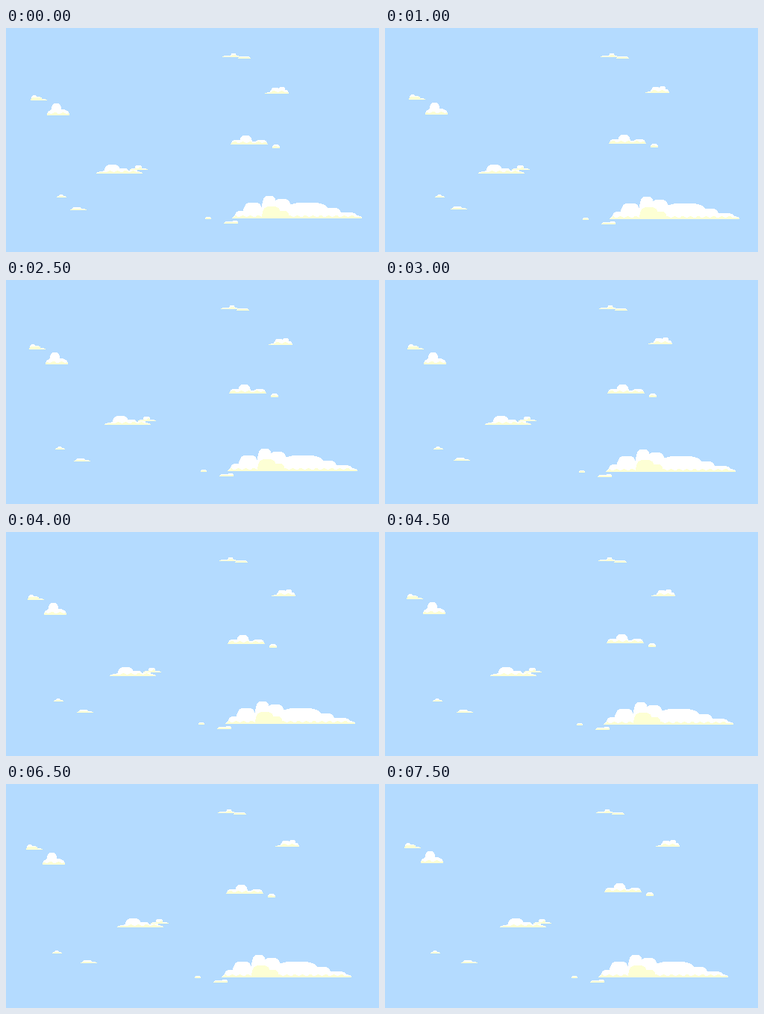
An HTML page with a canvas for the animation above (8 s loop, 500x300 px).

```html
<!DOCTYPE html>
<html lang="en">
<head>
<meta charset="utf-8">
<title>Drifting clouds</title>
<style>
html, body { margin: 0; width: 100%; height: 100%; overflow: hidden; background: #b4dbff; }
canvas { display: block; }
</style>
</head>
<body>
<canvas width="500" height="300"></canvas>
<script>
const STEP = 500, LOOP = 8000;
const WHITE = '#fff', CREAM = '#fdffd4';
const ctx = document.querySelector('canvas').getContext('2d');

// Whole-pixel drift: speed per step and starting fraction for each axis
const drift = (speed, start, sign) => k => sign * Math.floor(speed * k + start);

const level = { x: drift(.455, .37, -1), y: () => 0 };
const near = { x: drift(1.067, .5, 1), y: drift(.267, .55, -1) };
const rising = { x: drift(.5, 0, -1), y: drift(.72, .53, -1) };
const quick = { x: drift(2.18, .6, 1), y: drift(.2, .5, -1) };
const sinking = { x: drift(1.1, .55, -1), y: drift(.27, .6, 1) };

// A puff is a rounded mound standing on the cloud's base line
const puff = (centre, radius, height) => ({ centre, radius, height });

function heightAt(x, puffs) {
  const heights = puffs.map(({ centre, radius, height }) =>
    height * Math.sqrt(Math.max(0, 1 - ((x + .5 - centre) / radius) ** 4)));
  return Math.round(Math.max(0, ...heights));
}

const clouds = [];
function cloud(path, base, puffs, glow = []) {
  const start = Math.floor(Math.min(...puffs.map(p => p.centre - p.radius)));
  const end = Math.ceil(Math.max(...puffs.map(p => p.centre + p.radius)));
  clouds.push({ path, base, puffs, glow, start, end });
}

cloud(level, 39, [puff(302, 12, 2), puff(305, 4, 5)]);
cloud(level, 41, [puff(319.5, 8.5, 3)]);
cloud(level, 227, [puff(74.5, 6.5, 2), puff(74, 3.5, 4)]);

cloud(near, 88, [puff(363, 16, 2), puff(366, 13, 6), puff(361, 6, 8), puff(370, 5, 9)]);
cloud(near, 244, [puff(97, 11, 2), puff(95, 7, 4)]);

cloud(rising, 97, [puff(44, 11, 2), puff(41, 8, 5), puff(38, 4, 7)], [puff(41, 8, 4)]);
cloud(rising, 117, [puff(70, 15, 8), puff(67.5, 7.5, 16)]);
cloud(rising, 156, [puff(326, 25, 4), puff(309, 7, 6), puff(321.5, 8.5, 12), puff(342, 8, 6)]);
cloud(rising, 161, [puff(362, 5, 5)]);

cloud(quick, 195, [puff(152, 31, 4), puff(142.5, 11, 12), puff(157, 8, 7), puff(171, 6, 6)]);
cloud(quick, 190, [puff(178, 12.5, 2), puff(177.5, 5, 6)]);

cloud(sinking, 256, [puff(271, 4, 3)]);
cloud(sinking, 262, [puff(301.5, 9.5, 3), puff(307, 4, 4)]);
cloud(sinking, 255, [
  puff(370, 67, 7), puff(318, 12, 10), puff(331, 14, 21), puff(353, 11, 30),
  puff(370, 14, 26), puff(404, 32, 21), puff(438, 12, 14), puff(457, 14, 8), puff(465, 12, 4)
], [puff(356, 13, 16), puff(370, 10, 10)]);

function bar(x, base, height, colour) {
  ctx.fillStyle = colour;
  ctx.fillRect(x, base - height, 1, height);
}

function drawCloud({ base, puffs, glow, start, end }) {
  for (let x = start; x < end; x++) {
    const height = heightAt(x, puffs);
    const strip = Math.round(Math.min(height * .6, 3 + Math.sin(x * .6)));
    bar(x, base, height, WHITE);
    bar(x, base, Math.min(height, Math.max(strip, heightAt(x, glow))), CREAM);
  }
}

function draw() {
  const k = Math.floor(performance.now() % LOOP / STEP);
  ctx.clearRect(0, 0, 500, 300);
  for (const item of clouds) {
    ctx.save();
    ctx.translate(item.path.x(k), item.path.y(k));
    drawCloud(item);
    ctx.restore();
  }
  requestAnimationFrame(draw);
}
draw();
</script>
</body>
</html>
```
